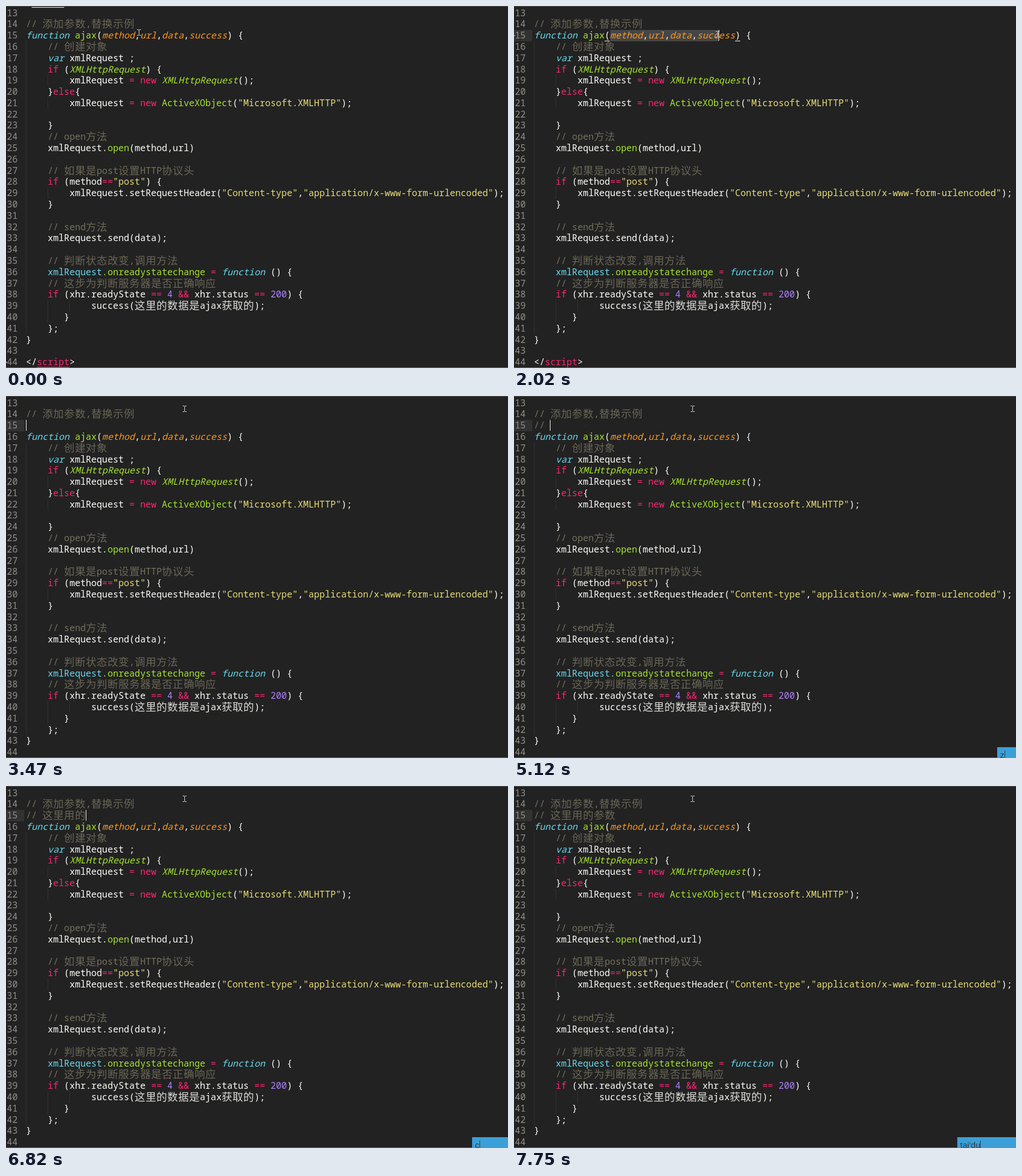
These frames come from a looping animation (881 by 636 pixels, 8000 ms). An HTML page with a canvas:

```html
<!DOCTYPE html>
<html lang="en">
<head>
<meta charset="utf-8">
<style>
html, body { margin: 0; width: 100%; height: 100%; overflow: hidden; background: #222; }
canvas { display: block; }
</style>
</head>
<body>
<canvas id="stage" width="881" height="636"></canvas>
<script>
const ctx = document.getElementById('stage').getContext('2d');
const LOOP = 8000, FIRST_LINE = 13, ROWS = 32;
const LEFT = 35.1, CELL = 9.537, ROW_H = 19.79;
const MONO = '500 15.9px "Noto Sans Mono", monospace';
const CJK = '300 18.5px "Noto Sans CJK SC", "Noto Sans CJK", sans-serif';

// "~x" inside a line switches to style x.
const STYLES = {
  w: ['#fcfcf8'], c: ['#75715e'], b: ['#66d9ef'], i: ['#66d9ef', true],
  g: ['#a6e22e'], h: ['#a6e22e', true], o: ['#fd971f', true],
  p: ['#f92672'], y: ['#e6db74'], v: ['#ae81ff']
};

const CODE = [
  '',
  '~c// 添加参数,替换示例',
  '~ifunction ~gajax~w(~omethod~w,~ourl~w,~odata~w,~osuccess~w) {',
  '    ~c// 创建对象',
  '    ~ivar~w xmlRequest ;',
  '    ~pif~w (~hXMLHttpRequest~w) {',
  '        xmlRequest ~p= new ~hXMLHttpRequest~w();',
  '    }~pelse~w{',
  '        xmlRequest ~p= new ~gActiveXObject~w(~y"Microsoft.XMLHTTP"~w);',
  '',
  '    }',
  '    ~c// open方法',
  '    xmlRequest.~gopen~w(method,url)',
  '',
  '    ~c// 如果是post设置HTTP协议头',
  '    ~pif~w (method~p==~y"post"~w) {',
  '        xmlRequest.setRequestHeader(~y"Content-type"~w,~y"application/x-www-form-urlencoded"~w);',
  '    }',
  '',
  '    ~c// send方法',
  '    xmlRequest.send(data);',
  '',
  '    ~c// 判断状态改变,调用方法',
  '    ~bxmlRequest~g.onreadystatechange ~p= ~ifunction~w () {',
  '    ~c// 这步为判断服务器是否正确响应',
  '    ~pif~w (xhr.readyState ~p==~v 4 ~p&&~w xhr.status ~p==~v 200~w) {',
  '            success(这里的数据是ajax获取的);',
  '       }',
  '    };',
  '}',
  '',
  '</~pscript~w>'
];

const DRAG_START = 1450, DRAG_END = 2530, DESELECT = 2800;
const CARET_SHOWN = 3320, NEW_LINE = 3470, KEY_GAP = 120, BLINK = 430;
const ANCHOR = 14, CLOSE_PAREN = 37;

// Pointer key points (time, x, y), joined by straight moves.
const PATH = [
  [0, 233, 46], [510, 222, 61], [900, 173, 51], [DRAG_START, 170, 51],
  [1720, 238, 50], [2020, 357, 49], [DRAG_END, 389, 48], [DESELECT, 313, 22], [LOOP, 313, 22]
];

const EDITS = [
  ...['', '/', '//', '// '].map((text, i) => [NEW_LINE + i * KEY_GAP, text]),
  [4410, '//  '], [4850, '// '], [6420, '// 这里用的'], [7300, '// 这里用的参数']
];

// Input method words: letters appear evenly over `typing` ms.
const WORDS = [
  { start: 5120, end: 6300, typing: 900, edge: 862, text: "zhe'li'yong'd" },
  { start: 6820, end: 7300, typing: 360, edge: 832, text: "can'shu" },
  { start: 7450, end: LOOP, typing: 300, edge: 862, text: "tai'du" }
];

const isWide = ch => ch > '\u2e80';
const cells = text => [...text].reduce((n, ch) => n + (isWide(ch) ? 2 : 1), 0);
const plain = line => line.replace(/~./g, '');
const colX = col => LEFT + col * CELL;
const rowY = row => Math.round(2 + row * ROW_H);
const baseline = row => Math.round(17.6 + row * ROW_H);

function pointer(t) {
  const i = PATH.findIndex(p => p[0] > t);
  const [t0, x0, y0] = PATH[i - 1], [t1, x1, y1] = PATH[i];
  const k = (t - t0) / (t1 - t0);
  return [Math.round(x0 + (x1 - x0) * k), Math.round(y0 + (y1 - y0) * k)];
}

function rect(color, x, y, w, h) {
  ctx.fillStyle = color;
  ctx.fillRect(x, y, w, h);
}

function drawChar(ch, x, y, italic) {
  const wide = isWide(ch);
  ctx.font = (italic ? 'italic ' : '') + (wide ? CJK : MONO);
  ctx.globalAlpha = wide ? 0.85 : 1;
  ctx.fillText(ch, x, wide ? y + 1 : y);
  ctx.globalAlpha = 1;
}

function drawLine(line, row) {
  let style = STYLES.w, col = 0;
  for (let i = 0; i < line.length; i++) {
    if (line[i] === '~') {
      style = STYLES[line[++i]];
      continue;
    }
    ctx.fillStyle = style[0];
    drawChar(line[i], colX(col), baseline(row), style[1]);
    col += cells(line[i]);
  }
}

function drawGuides(lines) {
  let indent = 0;
  for (let row = lines.length - 1; row >= 0; row--) {
    if (lines[row]) indent = lines[row].search(/\S/);
    for (let col = 0; col < indent; col += 4) {
      rect('#323232', Math.round(colX(col)), rowY(row), 1, rowY(row + 1) - rowY(row));
    }
  }
}

function drawNumber(row) {
  ctx.fillStyle = '#8f908a';
  [...String(FIRST_LINE + row)].forEach((d, i) => drawChar(d, 1.4 + i * CELL, baseline(row)));
}

function drawBrackets(t) {
  if (t < DRAG_START) {
    rect('#f8f8f2', 45, 2, 57, 1);
    rect('#f92672', Math.round(colX(2)), 634, 57, 1);
    rect('#8f908a', 0, 625, 2, 2);
  } else if (t < DESELECT) {
    for (const col of [ANCHOR - 1, CLOSE_PAREN]) rect('#f8f8f2', Math.round(colX(col)), 61, 9, 1);
    rect('#8f908a', 0, 51, 2, 2);
  }
}

function drawPointer([x, y]) {
  const color = '#d8d8d8';
  rect(color, x, y - 4, 1, 9);
  for (const dy of [-5, 5]) {
    rect(color, x - 3, y + dy, 3, 1);
    rect(color, x + 1, y + dy, 3, 1);
  }
}

function drawPopup(t) {
  const word = WORDS.find(w => t >= w.start && t < w.end);
  if (!word) return;
  const { start, typing, edge, text } = word;
  const step = typing / (text.length - 1);
  const input = text.slice(0, 1 + Math.floor((t - start) / step));
  const left = edge - 14 * input.length;
  rect('#3c9fd8', left, 617, 881 - left, 19);
  ctx.fillStyle = '#2c3e4a';
  ctx.font = '15px "Liberation Sans", Arial, sans-serif';
  ctx.fillText(input, left + 5, 636);
  rect('#2c3e4a', Math.round(left + 5 + ctx.measureText(input).width), 623, 1, 13);
}

function caretAt(t, selEnd) {
  if (t < DRAG_START) return { row: 0, on: false };
  if (t < DESELECT) return { row: 2, col: selEnd, on: true };
  if (t < NEW_LINE) return { row: 1, col: cells(plain(CODE[1])), on: t >= CARET_SHOWN };
  const [time, text] = EDITS.findLast(e => e[0] <= t);
  return { row: 2, col: cells(text), on: (t - time) % (2 * BLINK) < BLINK, text };
}

function draw(t) {
  const dragX = pointer(Math.min(t, DRAG_END))[0];
  const selEnd = Math.max(ANCHOR, Math.round((dragX - LEFT) / CELL));
  const caret = caretAt(t, selEnd);
  const lines = CODE.slice();
  if (t >= NEW_LINE) lines.splice(2, 0, caret.text && '~c' + caret.text);
  lines.length = ROWS;

  rect('#222', 0, 0, 881, 636);
  rect('#505050', 0, 0, 881, 1);
  rect('#6a6a6a', 0, 635, 881, 1);
  if (caret.row) rect('#323232', 0, rowY(caret.row), 32, 20);
  drawGuides(lines);
  if (t >= DRAG_START && t < DESELECT) {
    rect('#464646', colX(ANCHOR), rowY(2), (selEnd - ANCHOR) * CELL, 20);
  }
  lines.forEach((line, row) => {
    drawNumber(row);
    drawLine(line, row);
  });
  drawBrackets(t);
  if (caret.on) rect('#f8f8f0', Math.floor(colX(caret.col)), rowY(caret.row), 1, 19);
  drawPointer(pointer(t));
  drawPopup(t);
}

const origin = performance.now();
function tick() {
  draw((performance.now() - origin) % LOOP);
  requestAnimationFrame(tick);
}
tick();
</script>
</body>
</html>
```
